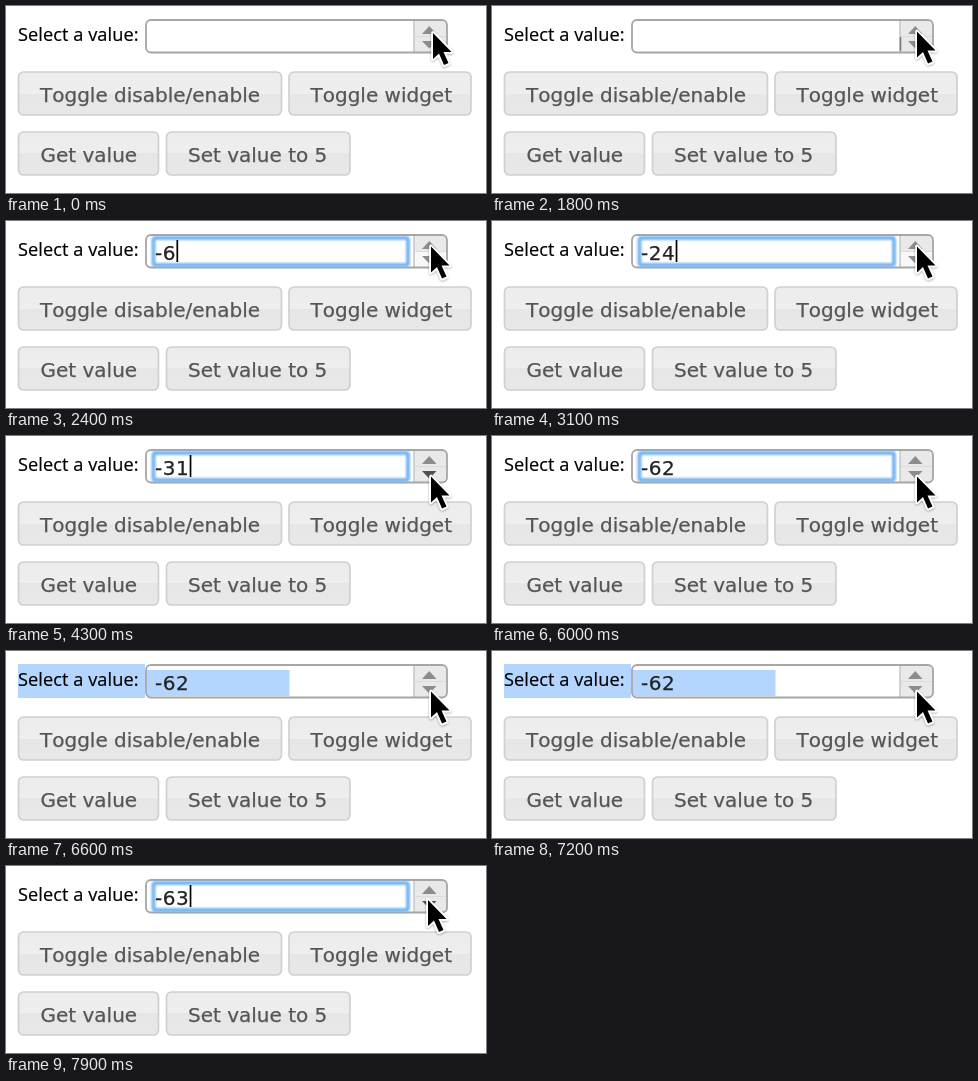
Recreate the animation shown at these times as an HTML page. Size 480 by 187 pixels, loop 8 s.

```html
<!DOCTYPE html>
<html lang="en">
<head>
<meta charset="utf-8">
<title>Spinner widget</title>
<style>
  html, body { margin: 0; width: 100%; height: 100%; overflow: hidden; background: #fff; }
  svg { display: block; font: 20px "DejaVu Sans", sans-serif; font-kerning: none; }
  .label { font: 18.2px "Open Sans", sans-serif; letter-spacing: .06px; stroke: #000; stroke-width: .2; }
  .button rect { fill: url(#glass); stroke: #d0d0d0; stroke-width: 1.7; }
  .button text { fill: #555; stroke: #555; stroke-width: .25; }
  .pick { fill: #b4d5fd; }
  #value { letter-spacing: .5px; fill: #222; stroke: #222; stroke-width: .25; }
  #cursor path { stroke: #fff; stroke-width: 3.6; stroke-linejoin: round; paint-order: stroke; }
</style>
</head>
<body>
<svg width="480" height="187" viewBox="0 0 480 187">
  <defs>
    <linearGradient id="glass" x2="0" y2="1">
      <stop offset="0" stop-color="#ececec"/>
      <stop offset=".5" stop-color="#eeeeee"/>
      <stop offset=".5" stop-color="#e6e6e6"/>
      <stop offset="1" stop-color="#e8e8e8"/>
    </linearGradient>
    <filter id="soft" x="-5%" y="-20%" width="110%" height="140%"><feGaussianBlur stdDeviation=".9"/></filter>
    <filter id="shade" x="-30%" y="-20%" width="160%" height="150%">
      <feDropShadow dx="0" dy="1" stdDeviation="1" flood-opacity=".35"/>
    </filter>
  </defs>

  <rect id="pickLabel" class="pick" x="12" y="13" width="127" height="34"/>
  <text class="label" x="12" y="35">Select a value:</text>

  <rect x="140" y="14" width="301" height="32.5" rx="5" fill="#fff"/>
  <path d="M408 14H436Q441 14 441 19V41.5Q441 46.5 436 46.5H408Z" fill="#e9e9e9"/>
  <rect id="lit" x="409" y="31" width="31" height="15" fill="#f8f8f8"/>
  <path d="M408 15V46" stroke="#c6c6c6" stroke-width="1.5"/>
  <path d="M409 30.5H440" stroke="#dcdcdc"/>
  <rect id="pickValue" class="pick" x="141" y="19" width="142.5" height="26"/>
  <rect x="140" y="14" width="301" height="32.5" rx="5" fill="none" stroke="#a6a6a6" stroke-width="1.8"/>
  <path d="M416 28L423.3 20L430.5 28Z" fill="#8c8c8c"/>
  <path id="down" d="M416 35L423.3 42.5L430.5 35Z"/>
  <path id="edge" d="M408.5 31V45" stroke="#777" stroke-width="1.5"/>

  <rect id="ring" x="147.5" y="17" width="254.5" height="27" rx="2" fill="none"
        stroke="#74b5f5" stroke-width="4" filter="url(#soft)"/>
  <text id="value" x="149" y="38.5"></text>
  <rect id="caret" y="19" width="1.7" height="22"/>

  <g id="buttons"></g>

  <g id="cursor"><path filter="url(#shade)" d="M0 0V26L6 20.5L11 32L15.5 30L10.5 19H18.5Z"/></g>
</svg>
<script>
const LOOP = 8000, TICK = 100;
const $ = id => document.getElementById(id);
const within = (t, a, b) => t >= a && t < b;

const buttons = [
  [12.5, 66, 263, 34, "Toggle disable/enable"],
  [283, 66, 182, 304.5, "Toggle widget"],
  [12.5, 126, 140, 34.5, "Get value"],
  [160.5, 126, 183.5, 182, "Set value to 5"]
];
$("buttons").innerHTML = buttons.map(([x, y, w, tx, label]) =>
  `<g class="button"><rect x="${x}" y="${y}" width="${w}" height="43" rx="5"/>` +
  `<text x="${tx}" y="${y + 29.5}">${label}</text></g>`).join("");

// Pointer keys: time, x, y
const pointer = [
  [0, 427, 27], [1700, 427, 27], [1800, 425, 25.5], [3500, 425, 25.5],
  [3800, 425, 40.5], [7400, 425, 40.5], [7800, 422, 34], [LOOP, 422, 34]
];

// Counter keys: time, value, change per tick
const counter = [
  [2000, -1, 0], [2300, -4, -2.5], [3300, -29, 0], [3700, -30, 0], [4000, -31, 0],
  [4300, -31, -2.5], [5500, -61, 0], [5800, -62, 0], [7800, -63, 0]
];

function pointerAt(t) {
  const i = pointer.findIndex(k => k[0] > t);
  const a = pointer[i - 1], b = pointer[i];
  const p = (t - a[0]) / (b[0] - a[0]);
  return [a[1] + (b[1] - a[1]) * p, a[2] + (b[2] - a[2]) * p];
}

function valueAt(t) {
  const key = counter.filter(k => k[0] <= t).pop();
  return key ? Math.ceil(key[1] + key[2] * (t - key[0]) / TICK) : "";
}

function show(id, on) {
  $(id).style.visibility = on ? "visible" : "hidden";
}

function draw(t) {
  const picked = within(t, 6400, 7400);
  const focused = t >= 2000 && !picked;
  const [x, y] = pointerAt(t);
  $("cursor").setAttribute("transform", `translate(${x} ${y})`);
  $("value").textContent = valueAt(t);
  $("caret").setAttribute("x", 149.5 + $("value").getComputedTextLength());
  $("down").setAttribute("fill", within(t, 3800, 5800) || t >= 7800 ? "#505050" : "#8c8c8c");
  show("lit", within(t, 2000, 3600));
  show("edge", within(t, 1800, 2000));
  show("ring", focused);
  show("caret", focused && !within(t, 6000, 6200));
  show("pickLabel", picked);
  show("pickValue", picked);
}

const start = performance.now();
function loop() {
  const t = (performance.now() - start) % LOOP;
  draw(Math.floor(t / TICK) * TICK);
  requestAnimationFrame(loop);
}
loop();
</script>
</body>
</html>
```
